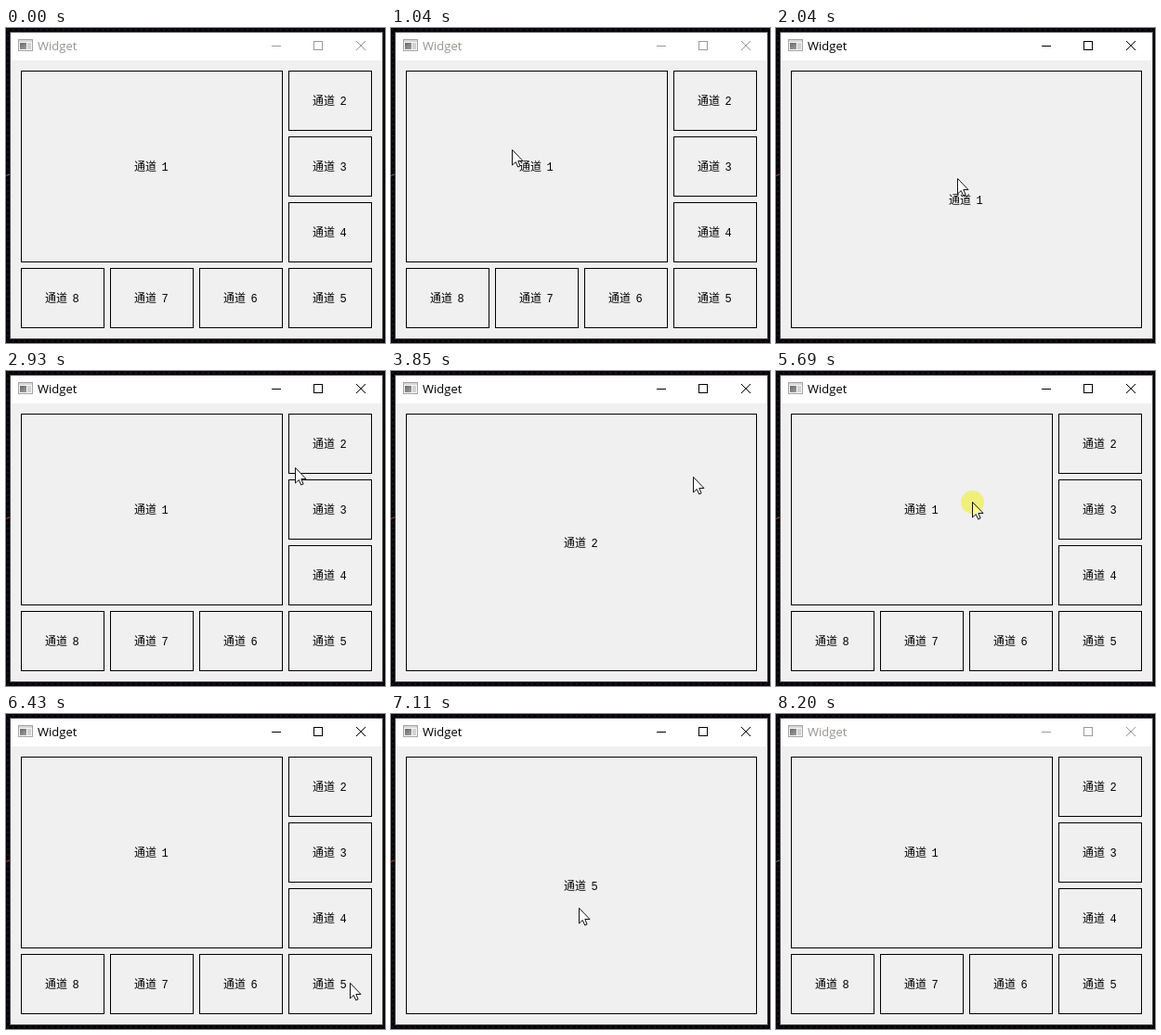
Write an HTML page with a canvas that moves like this. It is 408 px wide and 340 px high and loops after 8.28 s.

```html
<!DOCTYPE html>
<html lang="zh-CN">
<head>
<meta charset="utf-8">
<title>Widget</title>
<style>
html, body { margin: 0; width: 100%; height: 100%; overflow: hidden; background: #08060c; }
canvas { display: block; }
</style>
</head>
<body>
<canvas id="stage" width="408" height="340"></canvas>
<script>
const ctx = document.getElementById('stage').getContext('2d');
const LOOP = 8280, SLOT = 67, LEAD = 12;
const FOCUS_OFF = 8200, POINTER_ON = 540, POINTER_OFF = 7930;
const REST = 390;    // pause between a click and the next glide
const SETTLE = 130;  // pause between a glide and its click

const point = (x, y) => ({ x, y });

// Each round opens a channel at one spot and closes it at another
const rounds = [
  { channel: 1, open: 1440, aim: point(155, 135), close: 2310, leave: point(200, 165) },
  { channel: 2, open: 3260, aim: point(350, 82), close: 4060, leave: point(325, 114) },
  { channel: 3, open: 4800, aim: point(366, 141), close: 5550, leave: point(211, 141) },
  { channel: 5, open: 6500, aim: point(370, 290), close: 7240, leave: point(202, 209) }
];
const clicks = rounds.flatMap(r => [
  { time: r.open, shows: r.channel, ...r.aim },
  { time: r.close, shows: 0, ...r.leave }
]);
const enter = { time: POINTER_ON - REST, ...point(270, 212) };
const stops = [
  { time: POINTER_ON + 40, ...point(117, 129) },
  ...clicks,
  { time: POINTER_OFF + 100, ...point(386, 334) }
];

const slotsSince = (t, start) => Math.floor((t - start + LEAD) / SLOT);

function pointerAt(t) {
  let from = enter;
  for (const to of stops) {
    const start = from.time + REST;
    if (t < start) break;
    const steps = Math.max(3, Math.round((to.time - SETTLE - start) / SLOT));
    const p = Math.min(1, (slotsSince(t, start) + 1) / steps);
    if (p < 1) {
      const e = p * p * (3 - 2 * p);
      return point(Math.round(from.x + (to.x - from.x) * e),
                   Math.round(from.y + (to.y - from.y) * e));
    }
    from = to;
  }
  return from;
}

// A double click takes effect on its second press
function clickState(t) {
  let channel = 0, pressed = false;
  for (const { time, shows } of clicks) {
    if (t < time) break;
    const k = slotsSince(t, time);
    pressed = k === 0 || k === 2;
    if (k >= 2) channel = shows;
  }
  return { channel, pressed };
}

function rect(x, y, w, h, color) {
  ctx.fillStyle = color;
  ctx.fillRect(x, y, w, h);
}

function frame(x, y, w, h, color) {
  ctx.strokeStyle = color;
  ctx.lineWidth = 1;
  ctx.strokeRect(x + .5, y + .5, w - 1, h - 1);
}

function line(color, x1, y1, x2, y2) {
  ctx.strokeStyle = color;
  ctx.lineWidth = 1;
  ctx.beginPath();
  ctx.moveTo(x1, y1);
  ctx.lineTo(x2, y2);
  ctx.stroke();
}

function text(str, x, y, font, color) {
  ctx.font = font;
  ctx.fillStyle = color;
  ctx.fillText(str, x, y);
}

function cell(n, col, row, span) {
  const x = 16 + 96 * col, y = 46 + 71 * row;
  const w = 96 * span - 6, h = 71 * span - 6;
  const left = x + w / 2 - 19, base = y + Math.floor(h / 2) + 5;
  frame(x, y, w, h, '#000');
  text('通道', left, base, '500 12px "Noto Sans CJK SC", "Noto Sans CJK", sans-serif', '#000');
  text(n, left + 29.5, base, '12px "Liberation Mono", monospace', '#000');
}

// Channel 1 is large; the others run down the right and back along the bottom
function grid() {
  cell(1, 0, 0, 3);
  for (let n = 2; n <= 8; n++) cell(n, Math.min(3, 8 - n), Math.min(3, n - 2), 1);
}

function desktop(streak) {
  rect(0, 0, 408, 340, '#07050a');
  for (let y = 1; y < 340; y += 6)
    for (let x = 1; x < 408; x += 6) rect(x, y, 2, 2, '#17121d');
  line(streak, 0, 159.5, 5, 157.5);
}

function icon() {
  rect(13, 12, 16, 13, '#a4a4a4');
  rect(14, 13, 14, 2, '#d8d8d8');
  rect(14, 15, 14, 9, '#f6f6f6');
  const shade = ctx.createLinearGradient(15, 15, 22, 24);
  shade.addColorStop(0, '#666');
  shade.addColorStop(1, '#a2a2a2');
  rect(15, 16, 7, 7, shade);
  rect(23, 16, 4, 7, '#d2d2d2');
}

function windowFrame(active) {
  const ink = active ? '#000' : '#999';
  frame(4, 4, 402, 332, '#4a4a4a');
  rect(5, 5, 400, 30, '#fff');
  rect(5, 35, 400, 300, '#f0f0f0');
  icon();
  text('Widget', 34, 24, '13px "Open Sans", "Noto Sans", sans-serif', active ? '#000' : '#999390');
  rect(286, 19, 10, 1, ink);
  frame(331, 14, 10, 10, ink);
  line(ink, 377, 14, 387, 24);
  line(ink, 387, 14, 377, 24);
}

const arrow = new Path2D('M0 0V16.5L3.8 13L6.2 18.5L8.6 17.5L6.3 12H11.5Z');

function pointer({ x, y }, pressed) {
  ctx.save();
  ctx.translate(x + .5, y + .5);
  ctx.fillStyle = '#fff';
  ctx.strokeStyle = '#111';
  ctx.lineWidth = 1;
  ctx.fill(arrow);
  ctx.stroke(arrow);
  if (pressed) {
    // The highlight tints the arrow as well
    ctx.globalCompositeOperation = 'multiply';
    ctx.fillStyle = '#fffe84';
    ctx.beginPath();
    ctx.arc(0, 0, 12.5, 0, Math.PI * 2);
    ctx.fill();
  }
  ctx.restore();
}

function draw(t) {
  const active = t >= rounds[0].open && t < FOCUS_OFF;
  const { channel, pressed } = clickState(t);
  desktop(active ? '#a8472f' : '#806a68');
  windowFrame(active);
  if (channel) cell(channel, 0, 0, 4);
  else grid();
  if (t >= POINTER_ON && t < POINTER_OFF) pointer(pointerAt(t), pressed);
}

const began = performance.now();
function tick() {
  draw((performance.now() - began) % LOOP);
  requestAnimationFrame(tick);
}
tick();
</script>
</body>
</html>
```
